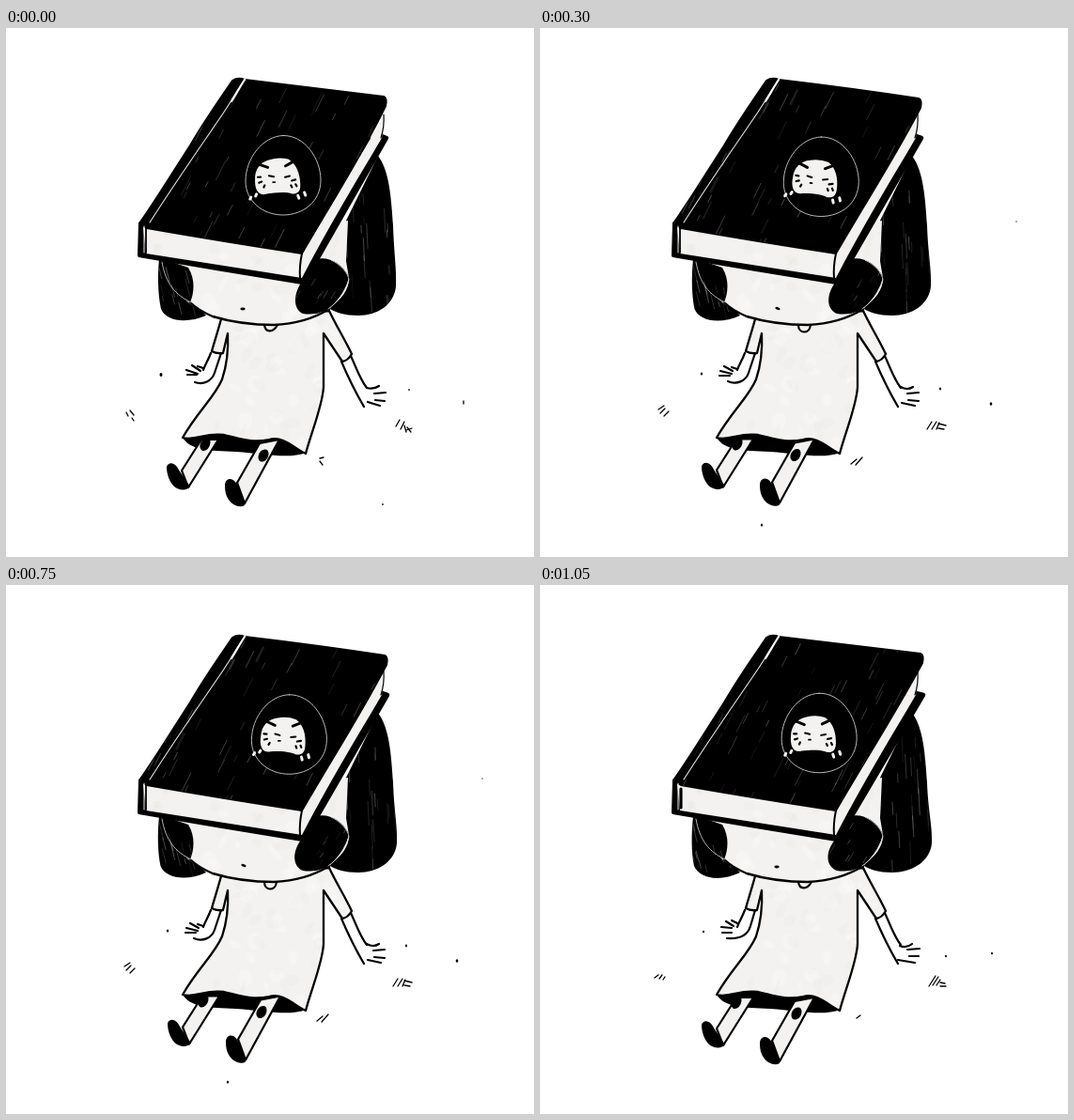
An HTML page with a canvas for the animation above (1200 ms loop, 562 px wide and 563 px high).

```html
<!DOCTYPE html>
<html lang="en">
<head>
<meta charset="utf-8">
<title>Girl under a book</title>
<style>
html, body { margin: 0; width: 100%; height: 100%; overflow: hidden; background: #fff; }
canvas { display: block; }
</style>
</head>
<body>
<canvas id="stage" width="562" height="563"></canvas>
<script>
const ctx = document.getElementById('stage').getContext('2d');
const BLACK = '#000', PAPER = '#f3f2f0';
const STEP_MS = 150, STEPS = 8;
const TILTS = [-2, 1, 7, 11, 15, 5, 2, 1];

// Ground marks of the three hand-drawn poses
const GRASS = [
  'M128 409l2 4M132 407l4 5M134 415l2 3M415 424l4-7M420 427l4-8M424 423l2 7M427 425l4 5M426 428l6-2M334 458l4-1M334 461l3 4M487 397v3',
  'M122 418l4-3M127 419l3-4M131 420l2-3M414 427l7-11M418 426l6-9M422 426l4-6M426 423l5 1M426 427l6 0M337 461l4-3',
  'M126 406l6-4M128 410l5-5M132 413l5-5M412 427l5-8M417 427l5-8M422 427l3-7M424 421l8 2M424 426l6 1M331 464l6-5M336 465l7-8'
];
const SPECKS = [
  [[165, 369, 1.5], [429, 385, .8], [401, 507, .8]],
  [[174, 369, 1], [432, 395, 1], [481, 392, 1]],
  [[172, 368, 1.2], [426, 384, 1.1], [480, 400, 1.3], [507, 206, .6], [236, 529, 1.2]]
];
const LEFT_HANDS = [
  'M192 364l12 4M193 369h10M198 359l9 6M204 360l6 2M201 377C210 380 219 376 222 367L229 346',
  'M193 364l11 1M194 370h10M198 358l8 5M204 357l6 3M199 376C212 377 221 373 224 363L229 346',
  'M192 365l12 3M191 370h11M196 360l9 5M204 361l6 2M200 376C209 380 219 376 222 367L229 346'
];
const RIGHT_HANDS = [
  'M384 383Q391 385 397 381M392 389l12-1M393 396l10 1M385 398l13 4',
  'M383 384Q390 387 396 382M391 388l13-1M393 395l10 0M381 399l18 3',
  'M384 382Q391 386 397 382M391 389l12-1M392 396l11 1M385 399l14 3'
];

function randomizer(seed) {
  return () => (seed = (seed * 16807) % 2147483647) / 2147483647;
}
function fill(path, color = BLACK) {
  ctx.fillStyle = color;
  ctx.fill(new Path2D(path));
}
function line(path, width = 2.2, color = BLACK) {
  ctx.strokeStyle = color;
  ctx.lineWidth = width;
  ctx.stroke(new Path2D(path));
}
function ellipse(x, y, rx, ry, angle = 0, color = BLACK) {
  ctx.fillStyle = color;
  ctx.beginPath();
  ctx.ellipse(x, y, rx, ry, angle, 0, Math.PI * 2);
  ctx.fill();
}
function shifted(x, y, draw) {
  ctx.save();
  ctx.translate(x, y);
  draw();
  ctx.restore();
}
function clipped(path, draw) {
  ctx.save();
  ctx.clip(new Path2D(path));
  draw();
  ctx.restore();
}

// Paper fill with faint mottling
function paper(path) {
  fill(path, PAPER);
  clipped(path, () => {
    const rnd = randomizer(77);
    for (let i = 0; i < 160; i++) {
      const tint = i % 2 ? 'rgba(255,255,255,.2)' : 'rgba(215,210,205,.12)';
      ellipse(160 + rnd() * 220, 200 + rnd() * 260, 3 + rnd() * 7, 2 + rnd() * 6, rnd() * 3, tint);
    }
  });
}

// Dry-brush scratches inside a black shape
function scratches(path, seed, count, [x, y, w, h], slant, length) {
  clipped(path, () => {
    const rnd = randomizer(seed);
    for (let i = 0; i < count; i++) {
      const px = x + rnd() * w, py = y + rnd() * h, dy = length * (.3 + rnd());
      line(`M${px} ${py}l${slant * dy} ${dy}`, .6, `rgba(255,255,255,${.1 + rnd() * .4})`);
    }
  });
}

function drawLegs(pose) {
  fill('M188 436C196 449 215 450 245 451C275 453 300 459 320 452L300 432L215 428Z');
  shifted([0, 1, 1][pose], [0, 1, -.5][pose], () => {
    const legs = ['M208 438L187 471L194 489L226 438Z', 'M270 442L246 484L254 506L291 438Z'];
    for (const leg of legs) {
      fill(leg, PAPER);
      line(leg, 2.2);
    }
    ellipse([212, 208, 209][pose], 443, 5, 7.5, .45);
    ellipse([274, 272, 271][pose], 455, 5, 7, .5);
    fill('M171 467C173 461 179 463 182 467C186 474 192 482 196 488C192 493 184 492 179 488C174 483 171 475 171 467Z');
    fill('M233 487C233 479 240 478 244 483C249 490 253 500 254 508C249 511 241 508 237 502C234 498 233 493 233 487Z');
  });
}

function drawBody(pose) {
  const dress = 'M230 306C227 318 222 333 219 344Q224 347 231 346L236 325C237 345 234 362 230 374'
    + 'C222 393 204 408 188 436C202 440 212 430 232 433C250 437 262 442 280 438'
    + 'C296 434 306 447 319 453C325 430 337 402 338 382L338 325L358 355Q364 354 368 347C360 330 352 318 344 301Z';
  paper(dress);
  line(dress, 2.3);
  line('M218 346C215 354 212 358 210 364');
  line(LEFT_HANDS[pose]);
  line('M367 349C373 362 377 374 384 383M357 355C363 369 371 386 381 403');
  line(RIGHT_HANDS[pose]);
  line(pose === 2 ? 'M275 316C275 326 287 326 288 316' : 'M275 316C276 324 284 325 289 316', 2.2);
}

function drawHead(pose) {
  const grow = [0, 2, 1][pose];
  const rightHair = `M396 136C408 152 410 180 412 210C413 240 ${416 + grow} 258 ${415 + grow} 275C${413 + grow} 295 395 306 375 306C360 306 352 303 345 299L360 250L362 205Z`;
  const leftHair = `M163 246C161 265 ${162 - grow / 2} 285 ${165 - grow / 2} 299C170 ${312 + grow / 2} 192 ${315 + grow / 2} 213 306L198 290L194 255Z`;
  fill(rightHair);
  fill(leftHair);
  paper('M168 245C170 275 195 297 215 304C240 313 262 316 285 316C330 314 366 290 365 266L362 248L364 205Z');
  const leftPatch = 'M165 245L194 255C202 268 200 283 196 292C182 287 170 272 165 245Z';
  const rightPatch = `M330 246C345 243 358 251 365 265C362 280 350 295 340 301Q328 306 316 304C${305 - grow} 299 ${306 - grow} 282 315 270Z`;
  fill(leftPatch);
  fill(rightPatch);
  const seed = 300 + pose * 91;
  scratches(rightHair, seed, 22, [362, 160, 55, 135], .05, 22);
  scratches(leftHair, seed + 5, 14, [163, 250, 40, 50], .25, 14);
  scratches(rightPatch, seed + 9, 10, [308, 250, 55, 45], -.6, 9);
  line('M196 292C204 300 213 304 220 307C240 313 262 316 285 316C308 315 328 309 344 299', 2.4);
  line('M166 249C170 272 180 284 197 292M346 247C357 252 364 261 365 268C362 280 352 293 343 299', .8, '#ddd');
  ellipse([252, 252, 253][pose], [299, 300, 298.5][pose], 2.7, 1.4, pose === 2 ? .3 : 0);
}

function drawBook(pose) {
  const x = [405, 408, 406][pose], y = [75, 75, 77][pose];
  const base = `M145 206L143 242Q230 257 317 271L${x} 117L400 115Z`;
  fill(base);
  line(base, 4.5);
  paper(`M146 212L316 239L402 94L400 117C373 163 343 212 315 266L149 240Z`);
  line('M315 240Q312 254 313 266', 2);
  line(`M402 92Q403 105 399 117`, 1.2);
  line(pose === 1 ? 'M150 217L150 237' : 'M149 213L149 239', pose === 1 ? 3.2 : 1.8);
  line('M143 208L142 242', 4);
  const cover = `M241 56Q247 52 254 55Q330 64 ${x - 3} ${y - 2}Q${x + 1} ${y} ${x - 1} ${y + 8}C378 137 345 188 315 240`
    + 'Q230 227 150 213L142 208C157 187 178 153 196 125C211 99 226 78 241 56Z';
  fill(cover);
  line(cover, 2);
  scratches(cover, 21 + pose * 137, pose === 1 ? 90 : 65, [150, 60, 245, 165], -.5, 15);
  line('M254 55C245 69 239 79 231 91C214 116 181 163 153 207', 1.1, '#e8e8e8');
  line('M254 55C250 61 245 70 240 78', 2.2, '#fff');
  line('M147 211L147 239', 1, '#eee');
}

function drawDoll(step) {
  const swing = 1 - Math.abs(step - 4) / 4;
  shifted(295 + 8.5 * swing, 157 + 3 * swing, () => {
    const egg = 'M0 -42.5C23 -43 40 -18 40 5C40 28 21 42 0 42C-22 42 -40 27 -40 6C-40 -18 -22 -42 0 -42.5Z';
    fill(egg);
    line(egg, .9, '#ccc');
    ctx.translate(-6, 1);
    ctx.rotate(TILTS[step] * Math.PI / 180);
    fill('M-24 2C-24 -8 -18 -16 -8 -18Q2 -21 12 -18C20 -13 24 -3 24 9C24 17 21 19 15 19C8 16 -4 17 -12 18C-21 21 -25 13 -24 2Z', PAPER);
    line('M-18 -13l8 3M9 -11l8 -4', 3);
    line('M-9 -1l5 1M8 1l5 -1', 2);
    line('M-5 6h2', 1.8);
    line('M-21 0l3 0M-20 6l3 -1M-15 11l1 -2M15 5l4 -1M14 10l1 2M19 9l1 2', 2.2);
    line('M-24 20l1 -2M-30 23l1 -2M22 24l-1 -3M29 21l-1 -3', 3, PAPER);
  });
}

function draw(step) {
  const pose = step % 3;
  ctx.fillStyle = '#fff';
  ctx.fillRect(0, 0, 562, 563);
  ctx.lineCap = ctx.lineJoin = 'round';
  line(GRASS[pose], 1.3);
  for (const [x, y, r] of SPECKS[pose]) ellipse(x, y, r, r * 1.3);
  drawLegs(pose);
  drawBody(pose);
  drawHead(pose);
  drawBook(pose);
  drawDoll(step);
}

let shown = -1;
function tick() {
  const step = Math.floor(performance.now() / STEP_MS) % STEPS;
  if (step !== shown) draw(shown = step);
  requestAnimationFrame(tick);
}
tick();
</script>
</body>
</html>
```
